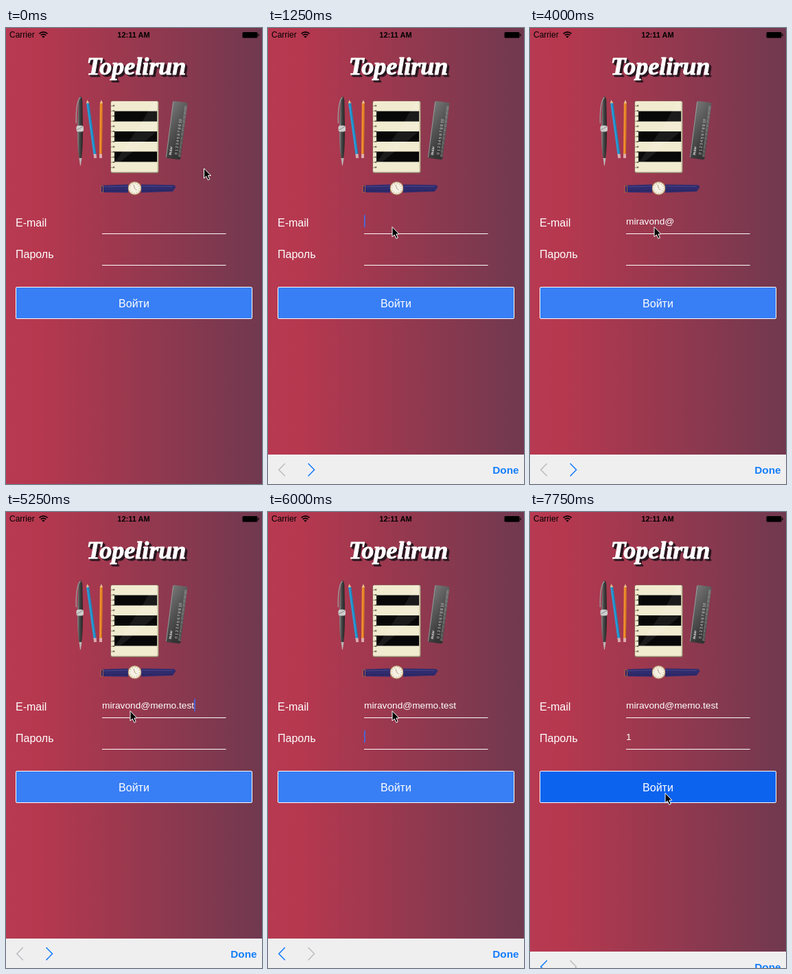
Recreate the animation shown at these times as an HTML page. Size 373 px wide and 666 px high, loop 8 s.

```html
<!DOCTYPE html>
<html lang="ru">
<head>
<meta charset="utf-8">
<title>Login form</title>
<style>
html, body { margin: 0; width: 100%; height: 100%; overflow: hidden; background: #b93850; }
svg { display: block; width: 373px; height: 666px; font-family: "Liberation Sans", Arial, sans-serif; }
.label { font-size: 16px; fill: #fff; }
.value { font-size: 13.7px; fill: #fff; }
.logo { font: italic bold 36px "Liberation Serif", "Noto Serif", serif; stroke-width: 1; stroke-linejoin: round; }
</style>
</head>
<body>
<svg viewBox="0 0 373 666" xmlns="http://www.w3.org/2000/svg">
  <defs>
    <linearGradient id="bg">
      <stop offset="0" stop-color="#b83a52"/>
      <stop offset=".12" stop-color="#b6384f"/>
      <stop offset="1" stop-color="#70394f"/>
    </linearGradient>
    <linearGradient id="steel">
      <stop offset="0" stop-color="#8b8b8b"/><stop offset=".4" stop-color="#484848"/><stop offset="1" stop-color="#222"/>
    </linearGradient>
    <linearGradient id="rule" x1="0" y1="0" x2=".5" y2="1">
      <stop offset="0" stop-color="#777"/><stop offset=".5" stop-color="#555"/><stop offset="1" stop-color="#343434"/>
    </linearGradient>
  </defs>
  <rect width="373" height="666" fill="url(#bg)"/>

  <g id="page">
    <g class="logo">
      <text x="121" y="71" fill="#2b1720" stroke="#2b1720">Topelirun</text>
      <text x="119.500" y="69.500" fill="#2b1720" stroke="#2b1720">Topelirun</text>
      <text x="117.500" y="68" fill="#fff" stroke="#fff">Topelirun</text>
    </g>

    <g id="pen">
      <path d="M108.500 100Q111 100 111.300 108L112 147Q112 178 110 190H106.500Q104 178 104 147L105.500 108Q106 100 108.500 100Z" fill="url(#steel)"/>
      <path d="M108.500 101Q101.500 108 102.300 139" fill="none" stroke="#999" stroke-width="1.400"/>
      <rect x="102.500" y="142.500" width="10.500" height="9" rx="3" fill="#cdcdcd"/>
      <path d="M103 149L112 144" stroke="#888"/>
      <path d="M106.500 190H110.500L108.800 201H108Z" fill="#b9b4b4"/>
    </g>

    <g id="pencils">
      <path d="M119 109L129.500 185" stroke="#299bd4" stroke-width="4"/>
      <path d="M120.300 110L130.800 185" stroke="#1b75a8" stroke-width="1"/>
      <path d="M118.300 105L116.900 110L121.200 109.500Z" fill="#e3bd8d"/>
      <path d="M129.400 184L130.200 190" stroke="#d9a9b0" stroke-width="4"/>
      <path d="M138.800 109L138 184" stroke="#f08d2c" stroke-width="4"/>
      <path d="M140.200 110L139.400 184" stroke="#b96420" stroke-width="1"/>
      <path d="M138.900 105L136.800 110H141Z" fill="#ecc594"/>
      <path d="M138 184V190" stroke="#dda9ac" stroke-width="4"/>
    </g>

    <g id="notebook">
      <rect x="152.500" y="106.500" width="70" height="105.500" rx="2.500" fill="#8d7f69"/>
      <rect x="153" y="107" width="68.500" height="103.500" rx="2" fill="#f1ebd0"/>
      <path d="M158 129H220.500M158 158.500H220.500M158 188H220.500" stroke="#080809" stroke-width="15"/>
      <path d="M221 107V150L166 196H159L199 136L215 107Z" fill="#fff" opacity=".08"/>
      <path d="M154.500 113V207" stroke="#b5ab8f" stroke-width="3" stroke-dasharray="1.500 6"/>
      <path d="M157 112.500V207" stroke="#6b6455" stroke-width="2.500" stroke-dasharray="2 5.500"/>
      <path d="M220.800 108V210" stroke="#cfc6a5"/>
    </g>

    <g id="ruler" transform="translate(248.500 149.500) rotate(7.200)">
      <rect x="-10.500" y="-42" width="21.500" height="84" rx="2" fill="url(#rule)"/>
      <path d="M-10 -41V41" stroke="#999"/>
      <path d="M9 -37V38" stroke="#bbb" stroke-width="3.500" stroke-dasharray=".600 1.500"/>
      <text transform="translate(5.500 35) rotate(-90)" font-size="5.500" fill="#ddd">0 1 2 3 4 5 6 7 8 9 10</text>
      <text transform="translate(-3 37) rotate(-90)" font-size="5" font-weight="bold" fill="#eee">Ruler</text>
    </g>

    <g id="watch">
      <path d="M139 229.800L178 228.500V240.500L139 240Z" fill="#2f2b6d"/>
      <path d="M197 228.500L245 229.300L247.500 232L243 238.800L197 240.500Z" fill="#2f2b6d"/>
      <path d="M142 232L178 231M197 231L243 231.500" stroke="#4b4888"/>
      <path d="M143 237.500H177M199 237.500H242" stroke="#241f52" stroke-dasharray="2 2"/>
      <rect x="137.500" y="230.500" width="4" height="9.500" fill="none" stroke="#9b5a48"/>
      <circle cx="187.500" cy="234" r="9.800" fill="#c3aa7b"/>
      <circle cx="187.500" cy="234" r="8.600" fill="#f6f1e4"/>
      <circle cx="187.500" cy="234" r="7" fill="none" stroke="#b8a67f" stroke-width="1.500" stroke-dasharray=".800 2.865"/>
      <path d="M186 229L187.500 234L190.500 237" fill="none" stroke="#9b8a6c" stroke-width=".8"/>
    </g>

    <text class="label" x="14" y="290">E-mail</text>
    <text class="label" x="14" y="336">Пароль</text>
    <path d="M140 300.500H320.500M140 346.500H320.500" stroke="#fff"/>
    <text class="value" id="email" x="140" y="287"></text>
    <text class="value" id="password" x="140" y="333"></text>
    <rect id="caret" width="1.700" height="18" fill="#426be6"/>
    <rect id="button" x="14.500" y="378.500" width="344" height="46" rx="1.500" stroke="#fff"/>
    <text class="label" x="186.500" y="407.500" text-anchor="middle">Войти</text>
  </g>

  <g id="status">
    <text x="5" y="14" font-size="12">Carrier</text>
    <path d="M48.500 8.300Q54.500 3.500 60.500 8.300M50.700 10.600Q54.500 7.600 58.300 10.600" fill="none" stroke="#000" stroke-width="1.700"/>
    <path d="M52.300 12.300Q54.500 10.500 56.700 12.300L54.500 14.600Z"/>
    <text x="186" y="14" font-size="11" font-weight="bold" text-anchor="middle">12:11 AM</text>
    <rect x="344.500" y="6" width="22" height="8.500" rx="1.500"/>
    <path d="M367.300 8.500H368.500V12H367.300Z"/>
  </g>

  <g id="toolbar">
    <rect y="623" width="373" height="44" fill="#f0eff0"/>
    <g fill="none" stroke-width="1.600">
      <path id="prev" d="M24.800 636L15.800 645.300L24.800 654.500"/>
      <path id="next" d="M58.500 636L67.500 645.300L58.500 654.500"/>
    </g>
    <text x="365.500" y="651" font-size="15.300" font-weight="bold" text-anchor="end" fill="#147efb">Done</text>
  </g>

  <path id="pointer" d="M0 0V14.500L3.300 11.500L5.800 17L8.300 15.900L5.900 10.500H10Z" fill="#000" stroke="#fff"/>
</svg>
<script>
const LOOP = 8000, TICK = 250;
const ADDRESS = "miravond@memo.test";
const BLUE = "#147efb", GRAY = "#bdbdc0";
const el = id => document.getElementById(id);

// Each track lists [start time, value]; a value holds until the next one.
const typed = [[0, 0], [2250, 1], [2750, 4], [3000, 5], [3250, 7], [3500, 9],
  [4250, 11], [4500, 13], [4750, 14], [5000, 15], [5250, 18]];
const caretOn = [[0, false], [1000, true], [1750, false], [2250, true], [4000, false],
  [4250, true], [7000, false]];
const barDrop = [[0, 44], [1000, 16], [1250, 0], [7750, 19]];
const pointerAt = [[0, [288.5, 205]], [250, [270, 219]], [500, [219, 260]], [750, [181, 290.5]],
  [7000, [189, 372]], [7250, [195, 416.5]], [7500, [197, 410.5]]];

const at = (track, t) => track.reduce((held, [start, value]) => t >= start ? value : held, track[0][1]);
const move = (id, x, y) => el(id).setAttribute("transform", `translate(${x} ${y})`);
const set = (id, name, value) => el(id).setAttribute(name, value);

function draw(time) {
  const t = Math.floor(time % LOOP / TICK) * TICK;
  const onPassword = t >= 5750;
  const field = el(onPassword ? "password" : "email");

  el("email").textContent = ADDRESS.slice(0, at(typed, t));
  el("password").textContent = t >= 6500 ? "1" : "";
  const width = field.textContent ? field.getComputedTextLength() : 0;
  set("caret", "x", 140 + width);
  set("caret", "y", onPassword ? 319 : 273);
  set("caret", "visibility", at(caretOn, t) ? "visible" : "hidden");

  move("page", 0, t === 5750 ? -16.5 : 0);
  move("toolbar", 0, at(barDrop, t));
  move("pointer", ...at(pointerAt, t));
  set("prev", "stroke", onPassword ? BLUE : GRAY);
  set("next", "stroke", onPassword ? GRAY : BLUE);
  set("button", "fill", t >= 7750 ? "#0c63ee" : "#387ef5");
}

const began = performance.now();
function frame() {
  draw(performance.now() - began);
  requestAnimationFrame(frame);
}
frame();
</script>
</body>
</html>
```
